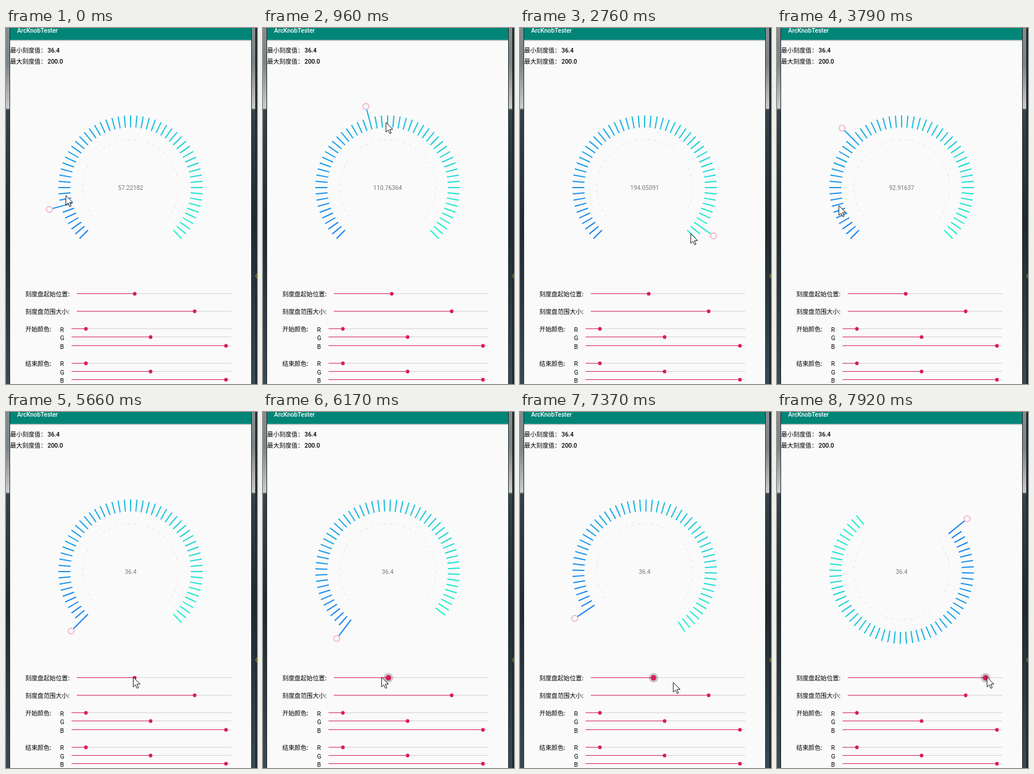
These frames come from a looping animation (429x609 px, 8 s). An HTML page with a canvas:

```html
<!DOCTYPE html>
<html lang="zh">
<head>
<meta charset="utf-8">
<title>Dial</title>
<style>
html, body { margin: 0; width: 100%; height: 100%; overflow: hidden; background: #fafafa; }
canvas { display: block; width: 429px; height: 609px; }
</style>
</head>
<body>
<canvas id="stage" width="429" height="609"></canvas>
<script>
const W = 429, H = 609, LOOP = 8000;
const BEAT = 141.5; // ms between screen refreshes; all motion is timed in beats
const CX = 213, CY = 273;
const TICKS = 55, STEP = 5;
const TRACK = 121, TRACK_END = 385;
const PINK = '#d81b60';
const FONT = 'Roboto, "Noto Sans CJK SC", "Noto Sans CJK", sans-serif';
const ctx = document.getElementById('stage').getContext('2d');

const rad = deg => deg * Math.PI / 180;
const mix = (a, b, k) => a + (b - a) * k;
const ramp = (t, from, to) => Math.min(1, Math.max(0, (t - from) / (to - from)));
const ease = (t, from, to) => {
  const u = ramp(t, from, to);
  return u * u * (3 - 2 * u);
};
const polar = (deg, r) => [CX + r * Math.cos(rad(deg)), CY + r * Math.sin(rad(deg))];

// Key points as [beat, value]
const knobKeys = [[0, 6], [13, 40], [17, 53], [22, 51], [23, 37], [26, 37], [27, 18], [30, 3], [34, 0]];
const handKeys = [[0, 173], [17, 405], [20, 405], [23, 243], [27, 164], [30, 130]];

function follow(keys, t) {
  const i = keys.findIndex(key => key[0] > t);
  if (i < 0) return keys[keys.length - 1][1];
  const [t0, a] = keys[i - 1], [t1, b] = keys[i];
  return mix(a, b, ramp(t, t0, t1));
}

// The start slider goes down, rests, then runs up to the right
function drag(t, from, to) {
  const low = 165;
  return from + (low - from) * ease(t, 42, 47) + (to - low) * ease(t, 49.5, 56);
}

function handAt(t) {
  const [x, y] = polar(follow(handKeys, t), 111.5);
  if (t <= 30) return [x, y];
  const glide = ease(t, 31, 38);
  const dip = 9 * Math.sin(Math.PI * ramp(t, 49, 55));
  return [mix(x, drag(t + 0.75, 217.5, 359), glide), mix(y, 453.7, glide) + dip];
}

function line(x0, y0, x1, y1, color, width) {
  ctx.strokeStyle = color;
  ctx.lineWidth = width;
  ctx.beginPath();
  ctx.moveTo(x0, y0);
  ctx.lineTo(x1, y1);
  ctx.stroke();
}

function disc(x, y, r, color) {
  ctx.fillStyle = color;
  ctx.beginPath();
  ctx.arc(x, y, r, 0, 2 * Math.PI);
  ctx.fill();
}

function arc(x, y, r, from, to, color, width) {
  ctx.strokeStyle = color;
  ctx.lineWidth = width;
  ctx.beginPath();
  ctx.arc(x, y, r, rad(from), rad(to));
  ctx.stroke();
}

function text(str, x, y, color = '#000', font = '500 10.4px', align = 'left') {
  ctx.font = font + ' ' + FONT;
  ctx.fillStyle = color;
  ctx.textAlign = align;
  ctx.fillText(str, x, y);
}

function shade(y0, y1, stops) {
  const g = ctx.createLinearGradient(0, y0, 0, y1);
  for (const [p, c] of stops) g.addColorStop(p, c);
  return g;
}

function drawWindow() {
  ctx.fillStyle = shade(0, H, [[0, '#858c8f'], [0.1, '#7d8487'], [0.225, '#c9cbcc'],
    [0.23, '#36434b'], [0.55, '#1f292f'], [1, '#3a4a54']]);
  ctx.fillRect(0, 0, W, H);
  ctx.fillStyle = '#20282c';
  ctx.fillRect(6, 0, 414, H);
  ctx.fillRect(426, 0, 3, H);
  arc(431, 424.5, 4, 0, 360, '#b5b52a', 1);

  ctx.fillStyle = '#fafafa';
  ctx.fillRect(7, 0, 412, H);
  ctx.fillStyle = shade(20, 23, [[0, 'rgba(0,0,0,.3)'], [1, 'rgba(0,0,0,0)']]);
  ctx.fillRect(7, 20, 412, 3);
  ctx.fillStyle = '#008577';
  ctx.fillRect(7, 0, 412, 20.4);
  text('ArcKnobTester', 19, 8, '#fff');
  [['最小刻度值：', '36.4'], ['最大刻度值：', '200.0']].forEach(([label, value], i) => {
    text(label, 7, 42 + i * 19.4);
    text(value, 71, 42 + i * 19.4);
  });
}

function slider(x0, x, y, pressed) {
  const mid = Math.floor(y) + 0.5;
  line(x0, mid, TRACK_END, mid, '#d2d2d2', 1);
  line(x0, mid, x, mid, PINK, 1);
  if (pressed) disc(x, mid + 0.2, 8.2, 'rgba(0,0,0,.2)');
  disc(x, mid + 0.2, pressed ? 4.7 : 3.1, PINK);
}

function drawControls(start, pressed) {
  text('刻度盘起始位置:', 33, 459.4);
  slider(TRACK, start, 454, pressed);
  text('刻度盘范围大小:', 33, 489.4);
  slider(TRACK, 322.5, 484, false);
  ['开始颜色:', '结束颜色:'].forEach((label, group) => {
    const y = 514.5 + group * 58.5;
    text(label, 33, y + 4.7);
    [['R', 0.09], ['G', 0.495], ['B', 0.967]].forEach(([channel, level], i) => {
      text(channel, 92.5, y + 5.2 + i * 14.5, '#000', '10.4px');
      slider(112, mix(112, TRACK_END, level), y + i * 14.3, false);
    });
  });
}

function tickColor(i) {
  const k = i / (TICKS - 1);
  return `rgb(${mix(24, 26, k)},${mix(128, 244, k)},${mix(244, 202, k)})`;
}

function drawDial(start, index) {
  const first = ramp(start, TRACK, TRACK_END) * 360;
  ctx.setLineDash([4, 7]);
  arc(CX, CY, 82, first, first + (TICKS - 1) * STEP, '#d6d6d6', 0.8);
  ctx.setLineDash([]);

  for (let i = 0; i < TICKS; i++) {
    const deg = first + i * STEP;
    const tip = i === index ? 138.5 : 123.5;
    line(...polar(deg, 103), ...polar(deg, tip), tickColor(i), 2);
  }
  arc(...polar(first + index * STEP, 143.8), 5, 0, 360, '#f4b9cd', 2.1);

  const share = index ? (index + 1) / TICKS : 0;
  const value = Math.ceil((36.4 + 163.6 * share) * 1e5 - 1e-6) / 1e5;
  text(String(value), CX, 277, '#777', '10.3px', 'center');
}

function drawCursor(x, y) {
  const outline = [[0, 0], [0, 16.5], [3.8, 13], [6.6, 19], [9, 18], [6.4, 12], [11.6, 11.7]];
  ctx.beginPath();
  for (const [dx, dy] of outline) ctx.lineTo(x + dx, y + dy);
  ctx.closePath();
  ctx.fillStyle = '#fff';
  ctx.fill();
  ctx.strokeStyle = '#111';
  ctx.lineWidth = 1;
  ctx.stroke();
}

function draw(now) {
  const beat = Math.floor((now % LOOP) / BEAT + 0.3);
  const start = drag(beat, 220, 356.5);
  drawWindow();
  drawDial(start, Math.round(follow(knobKeys, beat)));
  drawControls(start, beat > 42);
  drawCursor(...handAt(beat));
}

let origin;
function tick(now) {
  if (origin === undefined) origin = now;
  draw(now - origin);
  requestAnimationFrame(tick);
}
draw(0);
requestAnimationFrame(tick);
</script>
</body>
</html>
```
